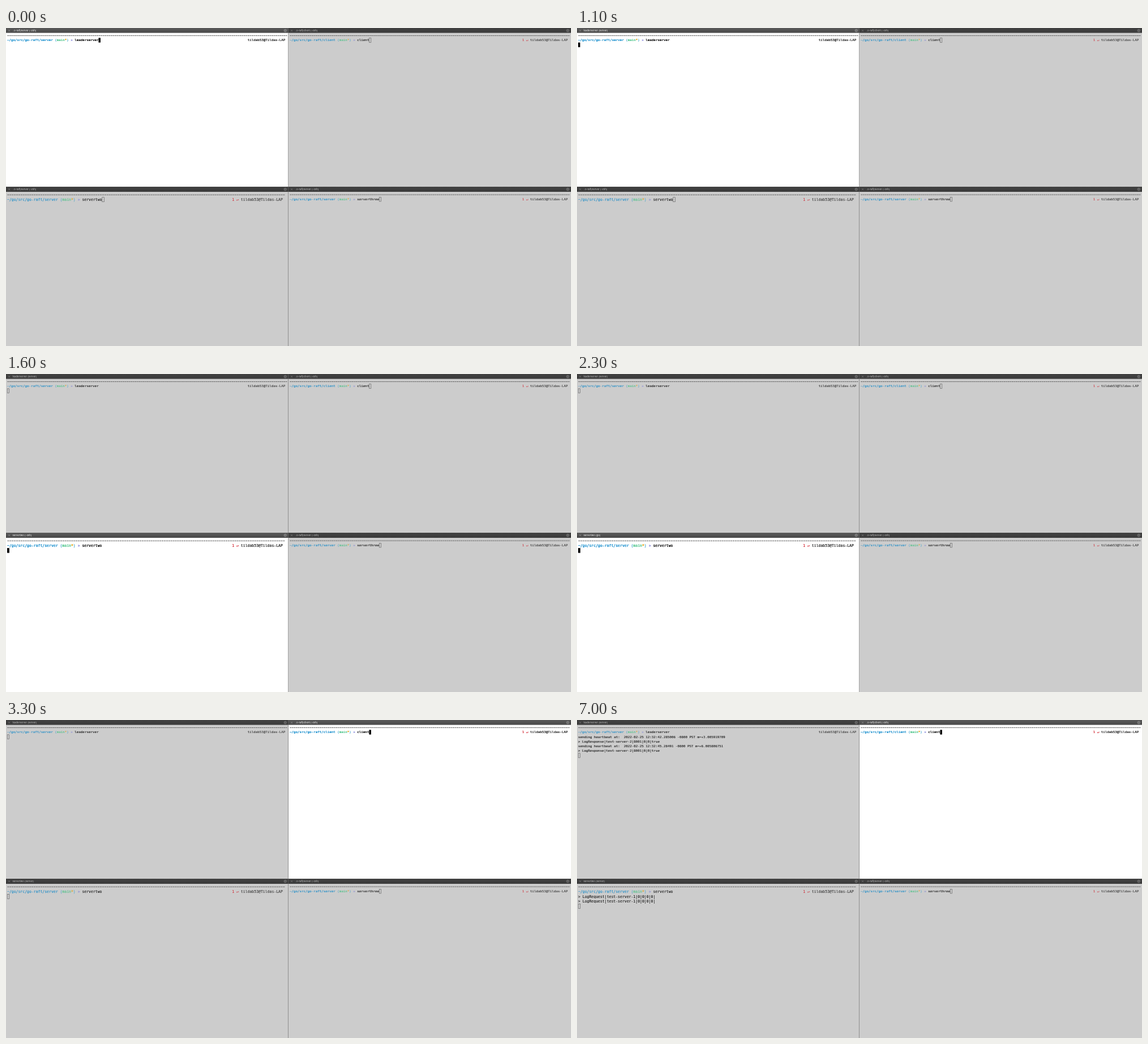
These frames come from a looping animation (998x561 px, 8000 ms). An HTML page with a canvas:

```html
<!DOCTYPE html>
<html lang="en">
<head>
<meta charset="utf-8">
<title>Raft cluster terminals</title>
<style>
  html, body { margin: 0; width: 100%; height: 100%; overflow: hidden; background: #ccc; }
  canvas { display: block; width: 998px; height: 561px; }
</style>
</head>
<body>
<canvas id="stage" width="998" height="561"></canvas>
<script>
const ctx = document.getElementById('stage').getContext('2d');
const LOOP = 8000;
const MONO = '"DejaVu Sans Mono", "Liberation Mono", monospace';
const SANS = 'Inter, Roboto, sans-serif';
const ADVANCE = 0.602;
const ZOOM = 10;
const HOST = 'tildab53@Tildas-LAP';
const BLUE = '#0083c8', PAREN = '#3fa4cc', GREEN = '#3fbf80', ORANGE = '#e09a00';
const ARROW = '#8080d8', RED = '#d01c28', GRAY = '#262626', BLACK = '#000';

const panes = [
  { x: 0, y: 0, w: 499, h: 280, size: 5.83, pitch: 8.2, cols: 141, dir: 'server', cmd: 'leaderserver' },
  { x: 499, y: 0, w: 499, h: 280, size: 5.83, pitch: 8.2, cols: 141, dir: 'client', cmd: 'client', failed: true },
  { x: 0, y: 280, w: 499, h: 281, size: 6.47, pitch: 8.6, cols: 126, dir: 'server', cmd: 'servertwo', failed: true },
  { x: 499, y: 280, w: 499, h: 281, size: 5.83, pitch: 8.2, cols: 141, dir: 'server', cmd: 'serverthree', failed: true }
];

const beats = [
  { at: 4000, stamp: '12:32:42.285006 -0800 PST m=+3.005919709' },
  { at: 7000, stamp: '12:32:45.28491 -0800 PST m=+6.005806751' }
];

// Latest value of a list of [time, value] steps
function stepAt(t, steps) {
  let value;
  for (const [at, v] of steps) if (t >= at) value = v;
  return value;
}

// Text is set large and scaled down so that advances stay fractional;
// heft thickens the strokes a little, in stage pixels
function text(str, x, y, size, color, family, heft = 0) {
  ctx.save();
  ctx.translate(x, y);
  ctx.scale(1 / ZOOM, 1 / ZOOM);
  ctx.font = `${size * ZOOM}px ${family}`;
  ctx.fillStyle = ctx.strokeStyle = color;
  ctx.fillText(str, 0, 0);
  if (heft) {
    ctx.lineWidth = heft * ZOOM;
    ctx.lineJoin = 'round';
    ctx.strokeText(str, 0, 0);
  }
  ctx.restore();
}

function titleBar(p, title, active) {
  const { x, y, w } = p;
  const cy = y + 4.6;
  const fade = ctx.createLinearGradient(0, y, 0, y + 9);
  fade.addColorStop(0, active ? '#5a5a5a' : '#424242');
  fade.addColorStop(1, active ? '#484848' : '#3a3a3a');
  ctx.fillStyle = fade;
  ctx.fillRect(x, y, w, y ? 9 : 8.6);

  ctx.strokeStyle = active ? '#a8a8a8' : '#909090';
  ctx.lineWidth = 0.5;
  ctx.beginPath();
  ctx.moveTo(x + 4, cy - 1.6);
  ctx.lineTo(x + 7.2, cy + 1.6);
  ctx.moveTo(x + 7.2, cy - 1.6);
  ctx.lineTo(x + 4, cy + 1.6);
  ctx.stroke();

  const cx = x + 493.3;
  ctx.strokeStyle = active ? '#c4c4c4' : '#aaa';
  ctx.beginPath();
  ctx.arc(cx, cy, 2.2, 0, Math.PI * 2);
  ctx.moveTo(cx - 1.2, cy - 0.5);
  ctx.lineTo(cx + 1.2, cy - 0.5);
  ctx.moveTo(cx - 0.7, cy + 0.6);
  ctx.lineTo(cx + 0.7, cy + 0.6);
  ctx.stroke();

  text(title, x + 11.4, cy + 1.5, 4.3, active ? '#f4f4f4' : '#bdbdbd', SANS);
}

function dashes(x, y, cell, count) {
  ctx.save();
  ctx.strokeStyle = GRAY;
  ctx.lineWidth = 0.75;
  ctx.setLineDash([cell * 0.8, cell * 0.2]);
  ctx.beginPath();
  ctx.moveTo(x + cell * 0.1, y);
  ctx.lineTo(x + cell * count, y);
  ctx.stroke();
  ctx.restore();
}

function drawPane(p, state, active) {
  const { size, pitch, cols } = p;
  const left = p.x + 2;
  const cell = size * ADVANCE;
  const rowTop = row => p.y + (p.y ? 9.8 : 9.2) + row * pitch;
  const put = (str, col, row, color) =>
    text(str, left + col * cell, rowTop(row) + size * 1.04, size, color, MONO, active ? 0.25 : 0.12);

  ctx.fillStyle = active ? '#fff' : '#ccc';
  ctx.fillRect(p.x, p.y, p.w, p.h);
  titleBar(p, state.title, active);

  ctx.globalAlpha = active ? 1 : 0.85;
  dashes(left, rowTop(0) + pitch * 0.53, cell, cols);

  let col = 0;
  const prompt = [['~/go/src/go-raft/' + p.dir + ' ', BLUE], ['(', PAREN], ['main', GREEN],
    ['*', ORANGE], [') ', PAREN], ['» ', ARROW]];
  for (const [str, color] of prompt) {
    put(str, col, 1, color);
    col += str.length;
  }
  put(p.cmd, col, 1, BLACK);

  const hostCol = cols - 1 - HOST.length;
  put(HOST, hostCol, 1, GRAY);
  if (p.failed) put('1 ↵', hostCol - 4, 1, RED);
  state.lines.forEach((line, i) => put(line, 0, 2 + i, BLACK));

  if (state.cursor) {
    const row = state.entered ? 2 + state.lines.length : 1;
    const cx = left + (state.entered ? 0 : col + p.cmd.length) * cell;
    const cy = rowTop(row);
    if (active) {
      ctx.fillStyle = BLACK;
      ctx.fillRect(cx, cy, cell, pitch);
    } else {
      ctx.strokeStyle = '#444';
      ctx.lineWidth = 0.6;
      ctx.strokeRect(cx + 0.3, cy + 0.3, cell - 0.4, pitch - 0.6);
    }
  }
  ctx.globalAlpha = 1;
}

function draw(t) {
  const focus = stepAt(t, [[0, 0], [1200, 2], [3100, 0], [3300, 1]]);
  const seen = beats.filter(b => t >= b.at);
  const idle = dir => ({ title: `..o-raft/${dir} (-zsh)`, lines: [], cursor: true, entered: false });

  const states = panes.map(p => idle(p.dir));
  Object.assign(states[0], {
    title: stepAt(t, [[0, states[0].title], [300, 'leaderserver (-zsh)'],
      [400, 'leaderserver (go)'], [1000, 'leaderserver (server)']]),
    lines: seen.flatMap(b => ['sending heartbeat at:  2022-02-25 ' + b.stamp,
      '> LogResponse|test-server-2|8001|0|0|true']),
    cursor: t < 100 || t >= 300,
    entered: t >= 300
  });
  Object.assign(states[2], {
    title: stepAt(t, [[0, states[2].title], [1600, 'servertwo (-zsh)'],
      [2300, 'servertwo (go)'], [3100, 'servertwo (server)']]),
    lines: seen.map(() => '> LogRequest|test-server-1|0|0|0|0|'),
    entered: t >= 1600
  });

  panes.forEach((p, i) => drawPane(p, states[i], i === focus));
  ctx.fillStyle = '#666';
  ctx.fillRect(498.4, 0, 0.6, 561);
}

const start = performance.now();
function tick() {
  draw((performance.now() - start) % LOOP);
  requestAnimationFrame(tick);
}
tick();
</script>
</body>
</html>
```
